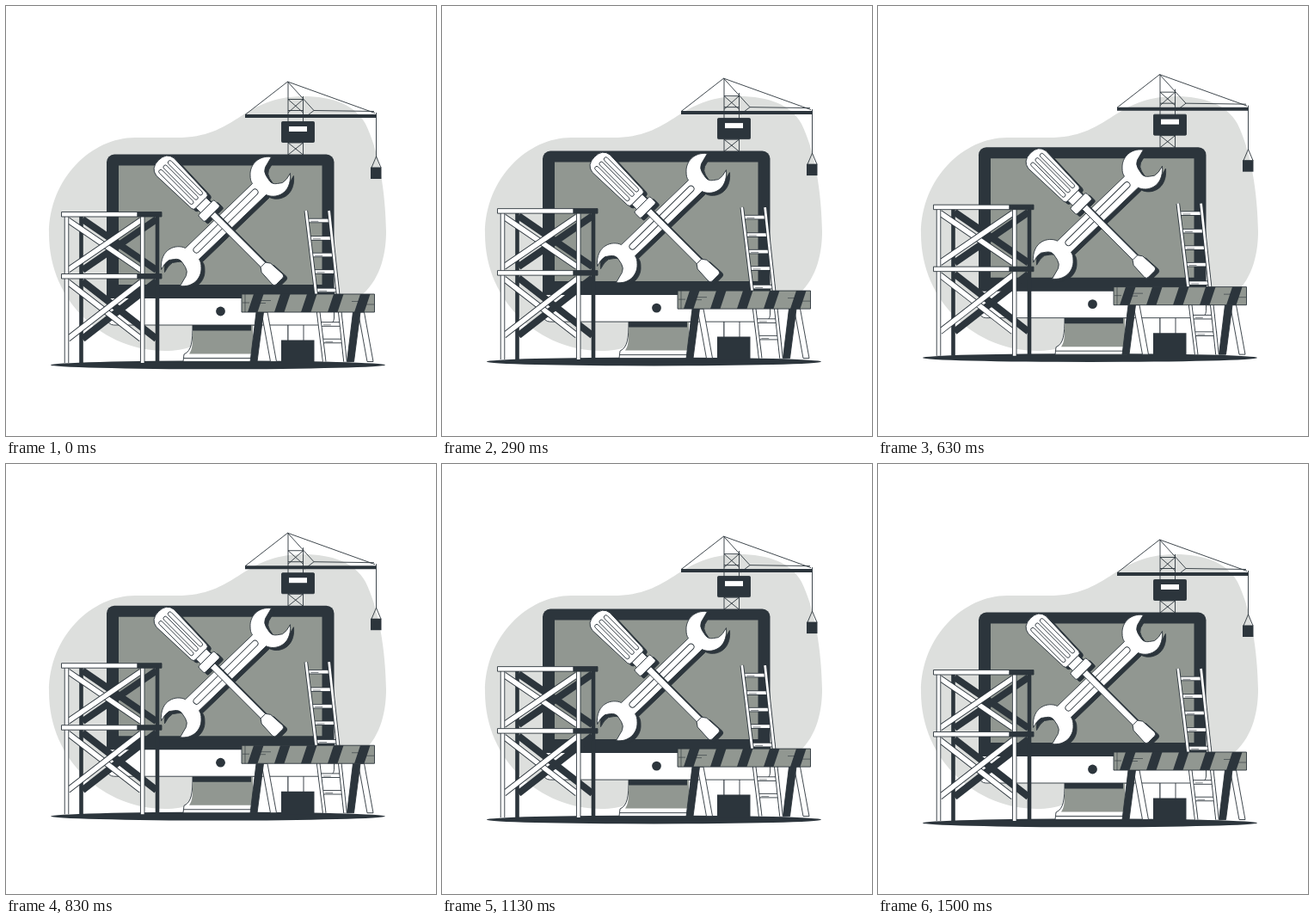
Write an HTML page with a canvas that moves like this. It is 500 px wide and 500 px high and loops after 1.54 s.

```html
<!DOCTYPE html>
<html lang="en">
<head>
<meta charset="utf-8">
<title>Under construction</title>
<style>
html, body { margin: 0; width: 100%; height: 100%; overflow: hidden; background: #fff; }
canvas { display: block; width: 500px; height: 500px; }
</style>
</head>
<body>
<canvas id="stage"></canvas>
<script>
const LOOP = 1540, FLOAT = 1500, FPS = 24, RISE = 10;
const DARK = '#2c353c', GRAY = '#919791', PALE = '#dddfdd', WHITE = '#fff';

const canvas = document.getElementById('stage');
const ctx = canvas.getContext('2d');
const ratio = window.devicePixelRatio || 1;
canvas.width = canvas.height = 500 * ratio;

function shape(path, fill, stroke = DARK) {
  const p = typeof path === 'string' ? new Path2D(path) : path;
  if (fill) { ctx.fillStyle = fill; ctx.fill(p); }
  if (stroke) { ctx.strokeStyle = stroke; ctx.lineWidth = 0.9; ctx.stroke(p); }
}

function box(x, y, w, h, fill, stroke = DARK, radius = 0) {
  const p = new Path2D();
  p.roundRect(x, y, w, h, radius);
  shape(p, fill, stroke);
}

function line(x1, y1, x2, y2, width = 0.9, color = DARK) {
  ctx.strokeStyle = color;
  ctx.lineWidth = width;
  ctx.beginPath();
  ctx.moveTo(x1, y1);
  ctx.lineTo(x2, y2);
  ctx.stroke();
}

// White bar with a thin dark outline
function bar(x1, y1, x2, y2, width) {
  line(x1, y1, x2, y2, width + 0.9);
  line(x1, y1, x2, y2, width - 0.9, WHITE);
}

function disc(x, y, rx, ry) {
  ctx.fillStyle = DARK;
  ctx.beginPath();
  ctx.ellipse(x, y, rx, ry, 0, 0, Math.PI * 2);
  ctx.fill();
}

function at(x, y, angle, draw) {
  ctx.save();
  ctx.translate(x, y);
  ctx.rotate(angle);
  draw();
  ctx.restore();
}

function drawBlob() {
  shape('M150 153C100 153 50 200 50 265C50 345 115 401 185 401C235 401 240 372 300 360' +
    'C345 352 385 358 415 335C437 315 442 285 442 262C441 215 434 170 418 137' +
    'C406 115 380 105 345 105C275 106 270 150 205 153Z', PALE, null);
}

function drawCrane() {
  for (const x of [328, 345.5]) line(x, x < 330 ? 88 : 105, x, 390);
  for (const [top, bottom] of [[108.5, 124], [159, 173]]) {
    line(328, top, 345.5, top);
    line(328, top, 345.5, bottom);
    line(345.5, top, 328, bottom);
  }
  line(328, 121.5, 345.5, 121.5);
  shape('M278 126.5L327.5 88L429 124.5M327.5 88L358 121.5L347 130M358 121.5L428 122.5', null);
  box(278, 126, 152.5, 4, DARK, null);
  box(320.5, 134.5, 38, 24, DARK, DARK, 1);
  box(329, 140, 21, 6, WHITE, null);
  line(430.5, 124, 430.5, 176);
  shape('M425 188L430.5 175L436 188', null);
  box(424, 187.5, 12.5, 13.5, DARK, null);
}

function drawMonitor() {
  // mast foot
  box(328, 365, 18, 25, WHITE);
  box(320, 388.5, 38.5, 27, DARK, null);
  // stand
  shape('M217 371C217 390 216 401 207 405L206 413.5H290V371Z', WHITE);
  shape('M217 371V380C217 392 217 399 213 404.5H287V371Z', GRAY, null);
  box(217, 371, 68, 6.5, DARK, null);
  line(207, 409.5, 290, 409.5);
  // chin, bezel and screen
  box(117.5, 330, 264, 41, WHITE, DARK, [0, 0, 8, 8]);
  box(117, 172.5, 264.5, 167.5, DARK, null, [9, 9, 0, 0]);
  box(131, 185.5, 236.5, 138.5, GRAY, null);
  disc(249.5, 355, 5.4, 5.4);
}

// Both heads are the same outline, turned by half a circle
const WRENCH = new Path2D(
  'M31-44C29-47 28.5-49 28.5-54C28-66 38-77 53-75L46-63Q44-58 47-53L51-47Q54-43 60-44L66-45Q71-48 75-56' +
  'C77-31 57-26 47-31L-31 44C-29 47-28.5 49-28.5 54C-28 66-38 77-53 75L-46 63Q-44 58-47 53' +
  'L-51 47Q-54 43-60 44L-66 45Q-71 48-75 56C-77 31-57 26-47 31Z');

function drawWrench() {
  at(259.5, 253.5, 0, () => shape(WRENCH, DARK));
  at(255.5, 250.5, 0, () => {
    shape(WRENCH, WHITE);
    ctx.lineCap = 'round';
    bar(34, -34, -34, 33, 7);
    ctx.lineCap = 'butt';
  });
}

function screwdriver(fill) {
  box(6, -3.8, 84, 7.6, fill);
  shape('M89-4L94-7.5L113-8.5Q116-8 116-5V5Q116 8 113 8.5L94 7.5L89 4Z', fill);
  shape('M-72-14.5L-16-12.5Q-13-12-13-9V9Q-13 12-16 12.5L-72 14.5Q-83 13-83 0Q-83-13-72-14.5Z', fill);
  box(-13, -8.5, 8, 17, fill);
  box(-5, -13, 10.5, 26, fill, DARK, 2);
}

function drawScrewdriver() {
  const angle = Math.PI / 4;
  at(240, 240.5, angle, () => screwdriver(DARK));
  at(236, 238, angle, () => {
    screwdriver(WHITE);
    for (const y of [-7.5, 0, 7.5]) box(-74, y - 2.3, 55, 4.6, WHITE, DARK, 2.3);
  });
}

function drawScaffold() {
  const levels = [[249, 307], [321, 387]];
  for (const x of [87.5, 176]) line(x, 243, x, 415, 4.6);
  for (const [top, bottom] of levels) {
    line(89, top - 1, 175, bottom, 8);
    line(89, bottom, 175, top - 1, 8);
  }
  for (const [top, bottom] of levels) {
    bar(72, top, 157, bottom, 6.5);
    bar(72, bottom, 157, top, 6.5);
  }
  for (const x of [70.5, 158.7]) bar(x, 243, x, 415, 4.6);
  for (const y of [239.5, 311.5]) {
    box(64.5, y, 88.5, 5.5, WHITE);
    box(153, y, 28, 5.5, DARK);
  }
}

function drawLadder() {
  for (const y of [249.5, 270, 289.5, 309, 330.5, 350, 370, 389.5]) {
    const x = 349 + (y - 238) * 0.12;
    bar(x, y, x + 27, y, 4.6);
    line(x + 4, y + 0.8, x + 13, y + 0.8, 0.6);
  }
  bar(348.8, 238, 370.2, 413.5, 3.6);
  bar(375.6, 238, 394.5, 413.5, 3.6);
}

function drawBarrier() {
  for (const dx of [0, 112.5]) {
    shape(`M${297 + dx} 356H${304 + dx}L${314.5 + dx} 413.5H${307.5 + dx}Z`, WHITE);
    shape(`M${291 + dx} 356H${299.5 + dx}L${292 + dx} 413.5H${284 + dx}Z`, DARK);
  }
  box(274, 335, 154.5, 21, GRAY);
  for (let k = 0; k < 5; k++) {
    const x = 281 + 31 * k;
    shape(`M${x} 356H${x + 11.5}L${x + 18.5} 335H${x + 7}Z`, DARK, null);
  }
  for (const [x, y, w] of [[275, 345, 8], [296, 342.5, 12], [292, 345.5, 10], [402, 343.5, 10], [419, 347, 9]]) {
    line(x, y, x + w, y, 0.6);
  }
  line(278, 335, 278, 356, 0.6);
}

// Linear up-and-down float, sampled at the playback rate
function lift(frame) {
  const phase = (frame * 1000 / FPS / FLOAT) % 1;
  return RISE * (1 - Math.abs(1 - 2 * phase));
}

function render(now) {
  const frame = Math.floor(((now % LOOP) + 5.01) * FPS / 1000);
  ctx.setTransform(ratio, 0, 0, ratio, 0, 0);
  ctx.fillStyle = WHITE;
  ctx.fillRect(0, 0, 500, 500);
  drawBlob();
  ctx.translate(0, lift(1) - lift(frame + 1));
  drawCrane();
  disc(246.5, 417.4, 194.5, 4.9);
  drawMonitor();
  drawWrench();
  drawScrewdriver();
  drawScaffold();
  drawLadder();
  drawBarrier();
}

const start = performance.now();
function tick() {
  render(performance.now() - start);
  requestAnimationFrame(tick);
}
tick();
</script>
</body>
</html>
```
